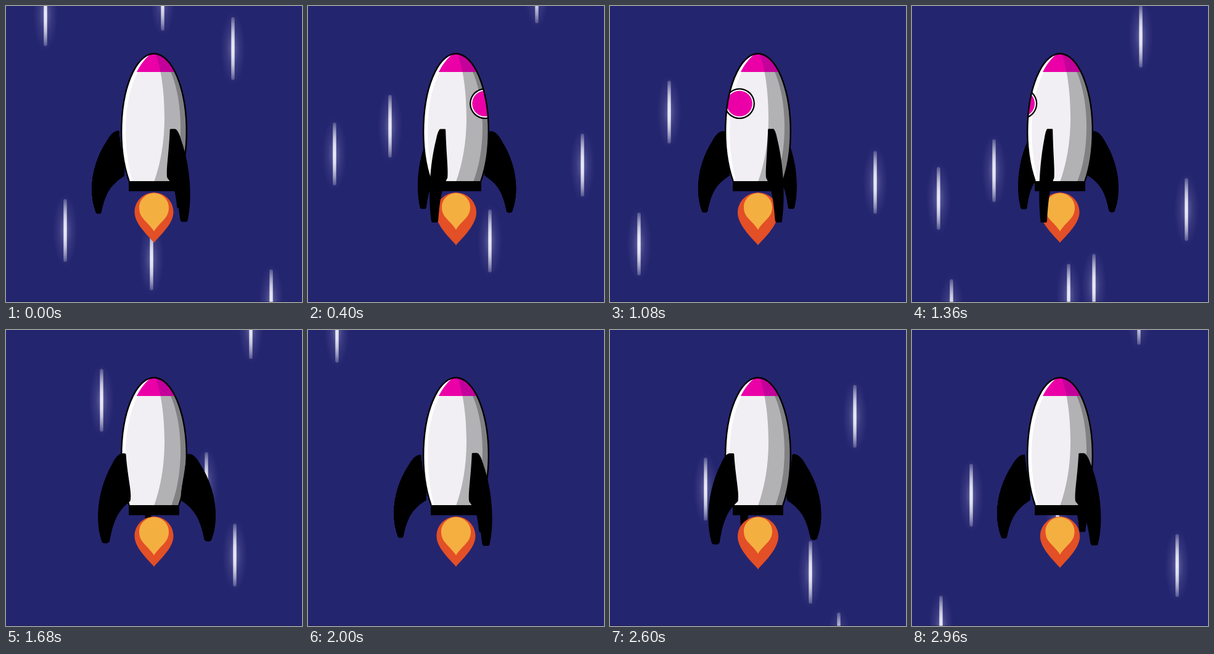
Write an HTML page with a canvas that moves like this. It is 480 by 480 pixels and loops after 3000 ms.

```html
<!DOCTYPE html>
<html lang="en">
<head>
<meta charset="utf-8">
<title>Rocket</title>
<style>
html, body { margin: 0; width: 100%; height: 100%; overflow: hidden; background: #24256f; }
canvas { display: block; width: 100vw; height: 100vh; }
</style>
</head>
<body>
<canvas id="stage" width="480" height="480"></canvas>
<script>
const ctx = document.getElementById('stage').getContext('2d');
const LOOP = 3000, STEP = 40, STEPS = LOOP / STEP;
const FALL = 96, STREAK = 102, DEPTH = 700, FIN_HALF = 4;
const BLACK = '#000', PINK = '#eb00a8';

// Three showers of streaks: the steps at which each one passes, and its points then.
const showers = [
  { passes: [-1, 28, 55, 74],
    points: [[64, -82], [254, -107], [368, -27], [96, 268], [236, 314], [430, 382], [47, 482]] },
  { passes: [10, 33.25, 56.5],
    points: [[43, 240], [133, 195], [445, 258], [371, -23], [295, 381]] },
  { passes: [20.5, 42, 63.5],
    points: [[155, 114], [397, -4], [325, 249], [371, 365]] }
];

function streak(x, y) {
  const half = STREAK / 2;
  if (Math.abs(y - 240) > 240 + STREAK) return;
  ctx.save();
  ctx.translate(x, y);

  const core = ctx.createLinearGradient(0, -half, 0, half);
  for (let i = 0; i <= 8; i++)
    core.addColorStop(i / 8, `rgba(255,255,255,${0.2 + 0.8 * Math.sin(i / 8 * Math.PI)})`);
  ctx.fillStyle = core;
  ctx.beginPath();
  ctx.roundRect(-2.7, -half, 5.4, STREAK, 2.7);
  ctx.fill();

  ctx.scale(20, half * 1.16);
  const glow = ctx.createRadialGradient(0, 0, 0, 0, 0, 1);
  glow.addColorStop(0, 'rgba(200,200,235,.4)');
  glow.addColorStop(0.5, 'rgba(170,170,220,.14)');
  glow.addColorStop(1, 'rgba(150,150,210,0)');
  ctx.fillStyle = glow;
  ctx.fillRect(-1, -1, 2, 2);
  ctx.restore();
}

// A flat radial panel seen in perspective, thickened along its tangent.
function fin(angle) {
  const sin = Math.sin(angle), cos = Math.cos(angle);
  const at = (r, y) => {
    const k = 1 / (1 - r * cos / DEPTH);
    return [240 + r * sin * k, 240 + y * k];
  };
  const panel = new Path2D();
  const curve = (...ends) => panel.bezierCurveTo(...ends.flatMap(p => at(...p)));
  panel.moveTo(...at(57, -37));
  curve([62, -39], [70, -33], [76, -22]);
  curve([92, 2], [101, 30], [101, 57]);
  curve([101, 76], [97, 88], [94, 96]);
  curve([91, 98], [88, 98], [86, 95]);
  curve([80, 66], [72, 50], [49, 36]);
  curve([45, 24], [54, 0], [57, -37]);

  ctx.fillStyle = BLACK;
  for (let d = -FIN_HALF; d <= FIN_HALF; d++) {
    ctx.save();
    ctx.translate(d * cos, 0);
    ctx.fill(panel);
    ctx.restore();
  }
}

function hull() {
  ctx.beginPath();
  ctx.ellipse(240, 203, 52.8, 125.7, 0, Math.PI - 0.7, 0.7);
}

function fillPath(color, d) {
  ctx.fillStyle = color;
  ctx.fill(new Path2D(d));
}

function disc(x, y, r, color) {
  ctx.fillStyle = color;
  ctx.beginPath();
  ctx.arc(x, y, r, 0, 7);
  ctx.fill();
}

function body(step) {
  const shade = 'M242 76C253 105 257 145 257 182C257 222 250 258 240 285H300V76Z';
  ctx.save();
  hull();
  ctx.clip();
  ctx.fillStyle = '#fff';
  ctx.fillRect(180, 70, 120, 220);
  fillPath('#f1eff3', 'M238 76C208 100 194 150 194 200C194 232 198 262 205 285H300V76Z');
  fillPath('#b2b1b4', shade);
  fillPath('#818083', 'M247 76C272 100 283 150 283 195C283 232 277 262 268 285H300V76Z');

  // Porthole sliding around the hull
  const x = 287 - 4.53 * (step - 10);
  disc(x, 158.3, 25, BLACK);
  disc(x, 158.3, 22.7, '#fff');
  disc(x, 158.3, 20.8, PINK);

  // Nose cone
  fillPath(PINK, 'M237 76C226 84 218 95 212 107H300V76Z');
  ctx.beginPath();
  ctx.rect(180, 70, 120, 37);
  ctx.clip();
  fillPath('#c4009a', shade);
  ctx.restore();

  hull();
  ctx.strokeStyle = BLACK;
  ctx.lineWidth = 2.4;
  ctx.stroke();
  ctx.fillStyle = BLACK;
  ctx.fillRect(199, 284, 82, 16.3);
}

function drop(color, top, mid, half, tip) {
  const bend = (mid - top) * 0.55;
  ctx.fillStyle = color;
  for (const side of [-half, half]) {
    ctx.beginPath();
    ctx.moveTo(240, top);
    ctx.bezierCurveTo(240 + side * 0.55, top, 240 + side, mid - bend, 240 + side, mid);
    ctx.bezierCurveTo(240 + side, mid + 17, 240 + side * 0.5, tip - 17, 240, tip);
    ctx.lineTo(240 - side * 0.02, tip);
    ctx.lineTo(240 - side * 0.02, top);
    ctx.fill();
  }
}

function flame(step) {
  const wave = 0.5 - 0.9 * Math.cos(step / STEPS * 18 * 2 * Math.PI);
  const m = Math.min(1, Math.max(0, wave));
  drop('#e34f26', 302.5, 334 + m, 31.5 + 1.5 * m, 383.5 + 4 * m);
  drop('#f4af41', 303.5, 327 - m, 24 - m, 365 - 2.5 * m);
}

function draw(time) {
  const step = Math.floor((time % LOOP) / STEP + 0.01);
  ctx.fillStyle = '#24256f';
  ctx.fillRect(0, 0, 480, 480);

  for (const { passes, points } of showers)
    for (const pass of passes)
      for (const [x, y] of points)
        streak(x, y + (step - pass) * FALL);

  ctx.fillStyle = 'rgba(0,0,0,.25)';
  ctx.fillRect(0, 479, 480, 1);

  // One turn per loop
  const angles = [0, 1, 2].map(i => 0.497 + (i / 3 - step / STEPS) * 2 * Math.PI);
  angles.filter(a => Math.cos(a) < 0).forEach(fin);
  body(step);
  flame(step);
  angles.filter(a => Math.cos(a) >= 0).forEach(fin);
}

const start = performance.now();
function tick() {
  draw(performance.now() - start);
  requestAnimationFrame(tick);
}
tick();
</script>
</body>
</html>
```
